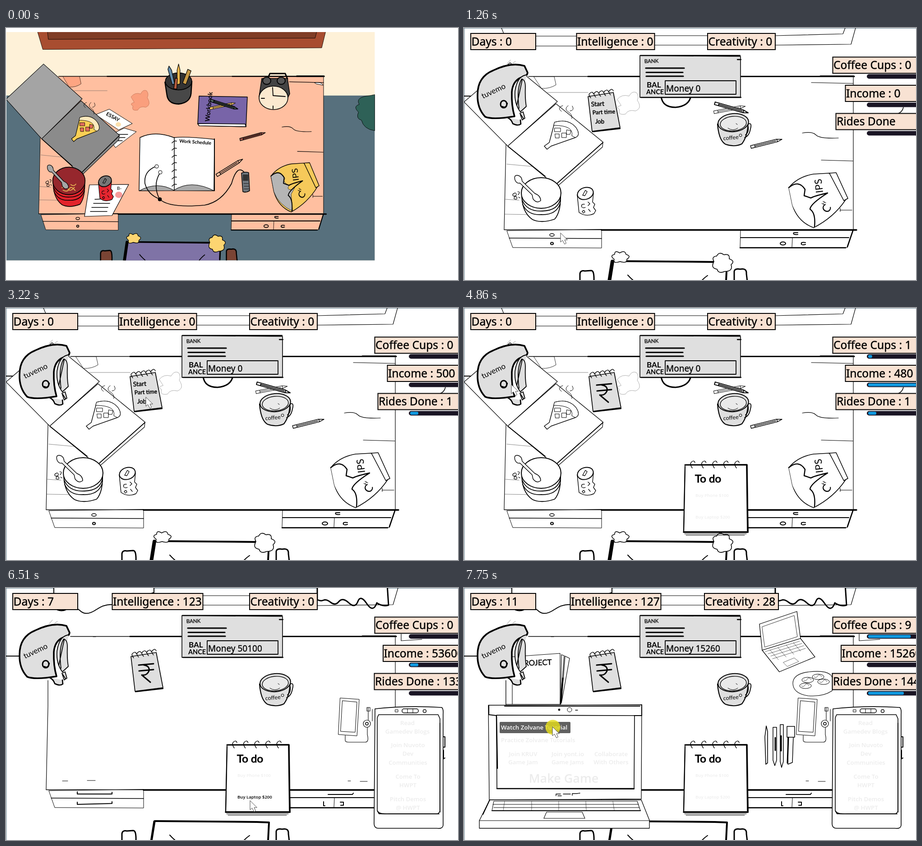
An HTML page for the animation above (7.81 s loop, 1002 by 559 pixels).

```html
<!DOCTYPE html>
<html lang="en">
<head>
<meta charset="utf-8">
<title>Desk game</title>
<style>
html,body{margin:0;width:100%;height:100%;overflow:hidden;background:#fff}
svg{display:block;width:1002px;height:559px}
path{stroke-linecap:round;stroke-linejoin:round}
</style>
</head>
<body>
<svg id="stage" viewBox="0 0 1002 559" xmlns="http://www.w3.org/2000/svg"></svg>
<script>
const LOOP = 7810, GREY = '#dfdfdf', PALE = '#ececec';
const HAND = "Lato,sans-serif", UI = "'Noto Sans','Open Sans',sans-serif", BTN = "'Open Sans','Noto Sans',sans-serif";

const P = (d, w = 1.5, fill = 'none', ink = '#000') =>
  `<path d="${d}" fill="${fill}" stroke="${ink}" stroke-width="${w}"/>`;
const E = (x, y, rx, ry, w = 1.5, fill = 'none', rot = 0) =>
  `<ellipse cx="${x}" cy="${y}" rx="${rx}" ry="${ry}" fill="${fill}" stroke="#000" stroke-width="${w}" transform="rotate(${rot} ${x} ${y})"/>`;
const R = (x, y, w, h, fill, sw = 0, r = 0) =>
  `<rect x="${x}" y="${y}" width="${w}" height="${h}" rx="${r}" fill="${fill}" stroke="#000" stroke-width="${sw}"/>`;
const T = (x, y, s, size, o = {}) =>
  `<text x="${x}" y="${y}" font-size="${size}" font-family="${o.font || HAND}" font-weight="${o.w || 400}" fill="${o.fill || '#000'}" stroke="#000" stroke-width="${o.bold || 0}" text-anchor="${o.mid ? 'middle' : 'start'}" transform="rotate(${o.rot || 0} ${x} ${y})">${s}</text>`;
const rings = (x, y, gap, n, h, slope = 0) => {
  let d = '';
  for (let i = 0; i < n; i++) d += `M${x + i * gap},${y + h + i * slope}q-7,${-h * .7} -1,${-h}q5,-4 7,2`;
  return P(d, 1.4);
};

// room and desk; tidy swaps handles, curtains and cushions
function room(col, tidy) {
  const f = c => col ? c : '#fff', desk = f('#ffbfa0');
  let s = '';
  if (col) s += R(0, -10, 1002, 580, '#fef1d8') + R(0, 155, 1002, 420, '#57707d') +
    P('M84,-8L100,41L858,37L870,-8Z', 1, '#a84d30') + P('M112,-8L115,16L840,13L846,-8Z', 1, '#803d26') +
    P('M990,155Q948,158 960,177Q942,182 958,196Q950,212 966,216Q972,238 1002,242V153Z', 1, '#2e6157');
  else s += P('M0,.5H1002M1,0V559', 1, 'none', '#6c8796') + P('M0,151H' + (tidy ? 30 : 16), 2);
  if (tidy) s += P('M106,0V44Q120,55 136,47T165,51T200,48T243,38L328,10V-8H106Z', 2, f('#9a3f46'))
    + P('M690,-8V26Q698,30 704,27T720,32T738,30T760,33T780,30T800,35T822,33Q835,42 848,38L845,-8Z', 3, f('#9a3f46'))
    + P('M428,17H540M428,38H540M690,39L858,37L869,0M876,102V117L922,114', 1.2);
  else if (!col) s += P('M83,0L88,12M160,18H250M160,40H250M423,17H540M423,38H540M690,17L840,13L845,0M690,38L858,36L868,0', 1.2)
    + P('M962,190Q972,186 974,176M984,233Q994,232 1002,238', 1.5);
  s += P('M96,108H863V447H89Z', 0, desk, 'none');
  s += P('M95,450L108,487L305,488V447Z', 1, desk) + P('M613,449L612,487H850L862,449Z', 1, desk);
  s += P('M143,107.5H863', 1.6) + P('M275,107.5H440M615,107.5H865', 3) + P('M790,107H864', 3.6);
  s += P('M93,205V262L89,447M863,107V447', 1.2) + P('M89,447.5H305', 1.6) + P('M305,448H870', 3.4) + P('M612,487.5H846M862,450L850,485', 2.6);
  s += P('M100,466L305,467', 1.3) + P('M613,465H853', 2.2) + P('M728,466L727,486', 1);
  if (tidy) s += P('M158,452V457H235V453M158,475V480L235,478V474', 2) + P('M714,458H768L770,455M704,474V483H707M741,475H748V482H742', 2)
    + P('M125,428H137M180,427H198M758,428H764M785,429H801M193,108H199', 1);
  else s += E(195, 459, 5, 3) + E(195, 478, 3, 2.5, 2) + P('M740,454H731Q728,459 740,458M757,476Q746,474 748,480Q751,482 757,480', 2) + E(707, 478, 6, 3.5, 2);
  s += P('M322,570L330,518L555,518L583,520L581,570Z', 1, f('#7f73a6')) + P('M322,562L329,518', tidy ? 5 : 8) + P('M330,517L555,519', 4) + P('M555,519L583,520L581,560', 4);
  s += P('M363,548Q370,556 378,562M540,549Q530,556 525,563', 2);
  s += P('M257,562V545Q258,537 268,539L282,538Q289,538 288,562', 3, f('#7a4434')) + P('M599,562V540Q600,533 612,535Q627,532 626,545L628,562', 3, f('#7a4434'));
  if (!tidy) s += P('M346,518Q330,524 333,513Q322,505 334,502Q334,492 345,499Q357,492 359,502Q372,506 361,513Q362,523 346,518Z', 1.5, f('#fcd571'))
    + P('M578,540Q564,546 561,535Q546,533 554,518Q548,507 560,506Q566,495 576,503Q590,500 588,512Q602,517 592,525Q597,540 578,540Z', 1.6, f('#fcd571'));
  return s;
}

const pen = (x, y, a, n, fill, w = 1.5) =>
  `<g transform="translate(${x} ${y}) rotate(${a})">${P(`M0,-3H${n - 11}L${n},0L${n - 11},3H0Z M9,-3V3M${n - 11},-3V3M9,0H${n - 14}`, w, fill)}</g>`;

// clutter lying on the untidy desk
function clutter(col) {
  const f = c => col ? c : '#fff';
  let s = P('M770,121L863,123M750,233Q772,229 780,237Q788,246 830,244M792,293L862,295M835,404H860M834,400V407', 1.2);
  s += P('M95,302L150,307M92,380L122,382M90,413L150,414M185,143H275', .7, 'none', '#555');
  s += P('M155,108H200L204,126Q190,135 172,134Z', .8, f('#fda582'));
  s += P('M340,158Q350,146 366,151Q372,139 382,143Q389,151 384,160Q396,178 380,184Q364,180 358,191Q340,194 345,181Q334,175 348,172Z', .8, f('#fa9f7d'), col ? '#b76b50' : '#999');
  // pencil pot
  s += P('M432,122L437,152Q440,176 469,176Q500,173 503,150L505,120Z', 3, f('#484848')) + E(469, 120, 36, 21, 2, f('#333'));
  s += P('M452,128L440,90L443,82L450,92L458,126Z', 1.5, f('#638cab')) + P('M465,128V92L469,77L473,92V126Z', 1.5, f('#f3b74c')) + P('M480,124L494,90L503,94L489,128Z', 1.5, f('#c89a45')) + P('M456,138L460,112L466,113L464,139Z', 1.5, f('#b55d3f'));
  // pizza box
  s += P('M0,164L102,77L207,163L97,262Z', 1.2, f('#a4a4a4')) + P('M97,262L204,168L308,253L307,264L206,352Z', 1.2, f('#8b8b8b'));
  s += P('M98,263L180,329M308,254L206,345', 1.9);
  s += P('M216,185Q205,177 219,172M231,172Q221,180 231,186T239,201M240,173Q246,183 235,184', 1);
  s += P('M184,269L178,262L189,254L201,209Q232,200 249,222Q259,238 247,243L193,262Z', 1.4, f('#f9cf55')) + P('M201,209Q232,200 249,222Q259,238 247,243L239,239Q244,216 199,216Z', 1, f('#fce9bd'));
  s += P('M201,222H214V230H201ZM217,233H227V243H217ZM202,235H211V244H203ZM228,226L237,228L235,236H227Z', 1, f('#e36d5c'));
  // bowl, spoon and flies
  s += P('M128,366Q127,408 152,425Q172,434 201,424Q216,407 214,364Z', 1.8, f('#e2232b')) + E(171, 366, 44, 34, 2, f('#96272d'));
  s += P('M129,382Q140,408 174,406Q209,405 214,378M130,391Q141,416 172,414Q204,415 213,390', 1.8);
  if (col) s += P('M152,383q10,-8 16,2t18,-3M155,389q12,6 17,-3t16,4M176,375q8,6 14,-1', 2, 'none', '#e6b653');
  s += P('M113,337Q110,325 120,327Q128,329 129,340L157,367Q170,372 170,383Q161,390 153,379L151,370L124,344Q117,346 113,337Z', 1.4, f('#a5a5a5'));
  s += P('M108,369q8,-7 8,2q-8,5 -8,-2m11,-6q7,0 1,7m-9,9q0,-8 6,-4q2,7 -6,4m10,-4l3,2', 1.2);
  // can
  s += P('M251,370L255,409Q270,420 288,412L292,405L287,398L290,391L285,386L287,366Z', 1.4, f('#e52630')) + E(269, 367, 18, 13, 2, f('#777'), -18);
  s += P('M263,371l6,-11l4,3l-5,9zM267,391q-8,-1 -6,6q2,3 8,1M262,407q4,-5 6,1q-3,5 -6,-1M275,386l4,4l-4,4M276,402l4,5', 1.3);
  // crisps
  s += P('M720,354Q740,330 775,324L810,322L846,381Q820,420 775,443Q740,430 728,393Z', 1.6, f('#f6c95a')) + P('M810,322L825,321L851,378L842,383Z', 1.6, f('#f6c95a'));
  s += P('M720,354Q742,335 758,360Q750,370 770,377Q760,388 777,388L785,382L775,399L779,441Q740,424 728,393Z', .8, f('#b5b5b5'), col ? '#000' : 'none') + P('M720,354Q742,336 756,358L754,372L769,377Q778,372 806,366Q768,390 767,402Q780,410 777,441', 2.4);
  s += T(796, 365, 'IPS', 22, {rot: -97}) + T(807, 412, 'C', 25, {rot: -60}) + T(799, 394, 'H', 11, {rot: -60});
  // pens
  s += pen(554, 187, -11, 71, f('#e9bb61'), 1) + pen(556, 167, 16, 77, f('#5b6d6d'), 2) + pen(636, 264, -14, 71, f('#aa5b4d'), 1.5);
  return s;
}

// things only the painted untidy desk has, in stage units
function extras() {
  let s = P('M425,213L428,151L535,153L532,219L445,217Z', 1.5, '#7864a8') + P('M425,212L530,213L532,219L428,217Z', 1.5, '#fff') + T(451, 208, 'Workbook', 14, {rot: -84, w: 700});
  s += P('M199,192L229,180L280,212L250,226ZM225,240L262,222L289,230L243,265Z', 1, '#fff') + T(221, 193, 'ESSAY', 11, {rot: 28, w: 700}) + P('M240,236H270M244,243H264M248,250H258', 1.4) + E(249, 214, 6, 5, 0, '#fbe0ae');
  s += P('M185,348L272,347L235,416L174,418Z', 1.2, '#fff') + P('M194,389H230M190,398H226M187,407H224M197,380L220,379', 1.5) + E(250, 370, 8, 7, 0, '#f79a9a') + T(246, 359, 'B-', 10);
  s += P('M297,243Q330,227 372,243Q400,240 462,247L461,361L372,360L295,361Z', 1.4, '#fff') + P('M296,361Q335,339 372,360Q410,335 461,361Z', 1.2, '#aaa');
  let d = 'M373,243V360';
  for (let y = 252; y < 360; y += 16) d += `M368,${y + 3}q5,-6 10,-4`;
  s += P(d, 1.5) + T(384, 254, 'Work Schedule', 10.5, {rot: 4, w: 700}) + P('M462,246V361', 2);
  s += P('M332,307Q305,318 308,345Q315,370 340,379Q360,400 440,393Q478,386 500,345Q512,302 528,320M341,322Q325,348 340,379', 1.7) + E(334, 307, 4, 4, 1, '#fff') + E(342, 320, 4, 4, 1, '#fff') + E(341, 380, 4, 4, 1, '#000');
  s += P('M522,322Q530,318 538,321L540,361Q532,366 525,363Z', 1.5, '#70777d') + R(525, 325, 12, 14, '#333') + P('M527,345h10M528,351h10M528,357h10', 1.6, 'none', '#333');
  s += pen(467, 327, -32, 68, '#ffbfa0', 1.4);
  s += P('M580,112L585,101H619L624,113', 3) + P('M561,152L567,112H624L629,146L624,156Z', 1.5, '#444') + E(578, 117, 9, 8, 2, '#555') + E(610, 117, 9, 8, 2, '#555') + E(593, 155, 32, 26, 1.6, '#fbe9cf') + P('M591,132L592,150L619,152M566,156H573M592,173V179', 1.8);
  s += P('M684,121Q700,119 703,127L688,124Z', 1, '#fff');
  return s;
}

const palmtop = f => P('M741,244L783,247L778,328L737,325ZM746,250L778,253L774,320L742,318Z', 1, f) +
  P('M752,327V338Q752,342 760,342H797Q805,341 801,325V309M803,297V265M800,265h7v8h-7zM812,269v26', 1.1) + E(800, 301, 8, 8, 1.2, f) + E(800, 301, 3, 3);
function rewards(f) {
  let s = P('M100,153L213,145V258H93V205M107,214V258', 1.1, f) + T(123, 173, 'PROJECT', 17, {rot: -2, bold: .4}) + P('M216,148L222,150L214,257ZM224,151L234,156L216,255Z', 1.2, f) + P('M219,200L214,257', 3);
  s += P('M655,80L738,52L746,112L661,138Z', 1.3, f) + P('M661,86L732,61L739,108L667,131Z', .8, f) + P('M661,138L746,112L778,153L699,186Z', 1.3, f) + P('M668,141L744,118M674,146L749,123M680,151L753,128M684,157L757,134M678,137L697,159M696,132L714,153M714,126L731,147M730,121L746,140M708,165L732,155L742,163L717,174Z', .6);
  s += P('M729,212Q729,190 765,186Q800,182 812,192Q824,205 816,228Q795,242 762,239Q730,234 729,212Z', 1.1, f);
  [[762, 204], [757, 217], [785, 197], [797, 208]].forEach(([x, y]) => s += E(x, y, 13, 6, 1, f) + P(`M${x - 9},${y}q5,4 8,-2t9,2`, .7));
  s += P('M670,306L667,330L669,391L673,388V318Z', 1.6, f) + P('M685,309h8v73l-4,12l-4,-12zM701,303h7v82l-4,13l-3,-13zM716,307h17v24h-17zM718,331h12l-2,56l-10,4z', 1.5, f) + P('M690,332V360M703,328V361M719,332L717,388', 3);
  return s;
}

const helmet = P('M95,198Q105,202 108,212Q119,218 126,213L125,204', 2.6, GREY) + P('M112,196Q64,204 47,197Q29,178 30,148Q30,108 65,94Q104,75 134,84L141,99Q140,108 126,110Q108,118 106,142Q105,172 112,196Z', 3.6, GREY) +
  P('M139,104Q118,106 113,140Q111,168 125,186L138,174Q135,155 136,130Q136,115 128,113Q116,133 122,178M129,115L117,172', 1.8, GREY) + P('M124,189L131,186L135,200L129,204ZM126,192L132,201', 1.8, GREY) +
  P('M95,80L103,71M108,78L114,74', .8, 'none', '#777') + T(42, 157, 'tuvemo', 17, {rot: -25}) + E(88, 169, 7, 8, 3) + P('M85,174Q93,179 96,167', 2.5);
const bank = P('M390,61L613,63V153L390,154Z', 1.6, GREY) + P('M391,61H612M606,70H614M392,154H614', 2.3) + T(400, 78, 'BANK', 11.5, {rot: -2, bold: .3}) +
  P('M403,89H488M404,98.5H485M404,107H486', 3.2) + T(405, 132, 'BAL', 17, {w: 700}) + T(404, 147, 'ANCE', 14.5, {w: 700}) + P('M446,117H603V147H446Z', 1.8, GREY);
const cup = P('M562,213Q565,250 580,258Q600,265 616,257Q629,240 630,209Z', 2.2, GREY) + E(597, 210, 34, 20, 2, GREY, -5) + E(597, 212, 29, 16, 1.4, '#eaeaea', -5) + P('M630,213Q639,209 635,224Q632,240 622,243M630,219Q632,232 624,237', 1.8) + P('M585,222Q596,230 607,222M603,212l3,2', 1) + T(575, 249, 'coffee', 12.5, {rot: -5}) + E(613, 238, 3, 3, 1);
const pad = P('M275,152L331,143L346,221L284,229Z', 1.7, GREY) + P('M285,230L346,223', 2.4) + rings(281, 144, 11, 5, 11, -1.6);
const jobPad = pad + T(282, 174, 'Start', 14, {rot: -3, bold: .5}) + T(285, 192, 'Part time', 12.5, {rot: -3, bold: .5}) + T(291, 212, 'Job', 13, {bold: .5});
const cashPad = `<g transform="translate(2 0)">${pad}</g>` + P('M294,171L327,168M295,184L327,181M306,171Q319,173 317,184Q312,195 301,193L320,209', 3);
const todo = P('M490,348L627,347L630,498H487Z', 1.6, '#fff') + P('M490,348H627', 3) + P('M627,348L629,497M487,497H629', 3.6) + P('M490,352L487,495', 2.3) + P('M489,501H626M492,504H622', 1) + rings(506, 341, 24.5, 5, 14) + T(512, 387, 'To&#160;do', 24, {bold: 1});
const phone = P('M818,268Q890,260 966,265Q970,268 969,280V526Q968,535 955,533H826Q815,533 816,520Z', 1.6, '#fff') + P('M826,281H958L962,290V496L957,501H827L823,494V288Z', 1.6, '#fff') + P('M824,495Q826,502 850,501M850,501H960M962,300V497M970,330H973V353H970M970,360V379L973,377', 2) + R(878, 268, 36, 9, '#fff', 1.5, 4) + P('M890,268v9M902,268v9M863,270h6v5h-6z', 1) + E(928, 273, 3.5, 3.5);
const bigLaptop = P('M54,260L394,259L393,468L56,470Z', 1.3, '#fff') + P('M55,261V281L72,283M394,259V283H377M90,262H390', 2) + P('M72,282L378,283L377,446L73,445Z', 1.6, '#fff') + P('M73,445H377M72,284L74,400', 2.5) + E(234, 270, 5, 5, 1) + E(211, 270, 2, 2, 1, '#000') + P('M247,271h5M204,461V457H214M208,461H216M240,460V456H250L257,455M220,457H236', 1.4) +
  P('M57,470H393L411,515V533H34V516Z', 1.3, '#fff') + P('M34,516H411M66,473H384L391,494H62ZM64,480H387M66,487H389M183,497H262L268,511H177Z', 1.1) +
  P('M90,473l-3,20M150,473v20M210,473v20M270,473l1,20M330,473l3,20', .6) + P('M57,470L42,502M62,494H391', 2);

const btn = (x, y, s, o = {}) => T(x, y, s, o.size || 13.3, {font: BTN, w: 600, fill: o.fill || PALE, mid: o.mid});
const rows = (x, list, o) => list.map(([y, s]) => btn(x, y, s, {mid: true, ...o})).join('');

const lineScene = (tidy, won) => room(0, tidy) + (tidy ? palmtop('#fff') + (won ? rewards('#fff') : '') : clutter(0));
const paint = inner => `<g clip-path="url(#frame)">${inner}</g>`;
const warp = s => `<g transform="matrix(.8157 0 0 .897 0 10.8)">${s}</g>`;
const scenes = {
  messy: paint(warp(room(1, 0)) + extras() + warp(clutter(1))),
  clean: paint(warp(room(1, 1) + rewards('#f4eee6') + palmtop('#f4eee6'))),
  line: lineScene(0), tidy: lineScene(1), won: lineScene(1, 1)
};

const label = (x, y, w, s) => R(x, y, w, 36, '#f8e2d3', 2) + T(x + 1.5, y + 26.5, s, 24.6, {font: UI, w: 500, bold: .45});
const bar = (y, end) => R(893, y - 4.5, 120, 10, '#1a1524', 0, 5) + (end ? R(896, y - 3, end - 896, 7, 'url(#blue)', 0, 3) : '');
const centred = (mid, base, name, v) => {
  const w = base + 14 * String(v).length;
  return label(mid - w / 2, 12, w, `${name} : ${v}`);
};

// stepped progress through a time window
const part = (t, a, b, n) => t < a ? 0 : Math.min(1, (Math.floor((t - a) / ((b - a) / (n - 1)) + 1e-6) + 1) / n);
const ramp = (p, a, b) => Math.max(0, Math.min(1, (p - a) / (b - a)));
const mix = (a, b, p) => Math.round(a + (b - a) * p);
const along = (p, pts) => {
  let i = 0;
  while (i < pts.length - 2 && p > pts[i + 1][0]) i++;
  const [a, x, y] = pts[i], [b, u, v] = pts[i + 1], k = ramp(p, a, b);
  return [x + (u - x) * k, y + (v - y) * k];
};

function stateAt(t) {
  const A = part(t, 1590, 2370, 13), B = part(t, 2520, 3300, 13), D = part(t, 3560, 4340, 13), F = part(t, 4400, 5060, 11),
    G = part(t, 5200, 5530, 6), H = part(t, 5670, 5730, 2), I = part(t, 5870, 6630, 13), J = part(t, 6750, 7490, 12), K = part(t, 7550, 7750, 3);
  let pos;
  if (t < 2520) pos = along(A, [[0, 214, 455], [.3, 520, 474], [.55, 802, 340], [.75, 470, 200], [.92, 51, 91], [1, 80, 140]]);
  else if (t < 3560) pos = along(B, [[0, 80, 140], [.15, 52, 92], [.4, 95, 160], [.62, 200, 238], [.82, 310, 198], [1, 310, 198]]);
  else if (t < 4400) pos = along(D, [[0, 312, 200], [.4, 560, 320], [.6, 590, 215], [1, 600, 220]]);
  else if (t < 5200) pos = along(F, [[0, 600, 220], [.45, 105, 170], [.75, 105, 170], [.9, 540, 410], [1, 885, 320]]);
  else if (t < 5870) pos = along(G, [[0, 885, 320], [.3, 885, 305], [1, 885, 305]]);
  else if (t < 6750) pos = along(I, [[0, 885, 305], [.25, 885, 305], [.45, 94, 160], [.6, 94, 160], [.72, 590, 220], [.84, 541, 472], [1, 541, 472]]);
  else pos = along(J, [[0, 541, 472], [.2, 541, 472], [.4, 100, 165], [.6, 590, 215], [.8, 196, 308], [1, 196, 308]]);

  const run = ramp(F, .7, 1), ride = ramp(I, .45, .65), last = ramp(J, .35, .65);
  const s = {pos, scene: J > .3 ? 'won' : F > .75 ? 'tidy' : 'line', hide: t >= 3420 && t < 3560,
    cash: F > .15, todo: D > .35, phone: F > .75, laptop: J > .2, G, H, I, J, K, t};
  s.days = t >= 6750 ? mix(7, 11, last) : I ? mix(5, 7, ride) : mix(0, 5, run);
  s.iq = J ? mix(123, 127, last) : I ? mix(20, 123, ramp(I, 0, .3)) : H ? 16 + 4 * H : mix(0, 16.5, G);
  s.art = K ? mix(25, 28, K) : mix(0, 25, ramp(J, .75, 1));
  s.rides = J ? mix(133, 144, last) : I ? mix(74, 133, ride) : run ? mix(1, 74, run) : B > .4 ? 1 : '';
  s.income = J > .2 ? mix(13600, 15260, last) : I ? mix(229, 536, ride) * 100 : run ? mix(480, 22900, run) : D > .6 ? 480 : B > .45 ? 500 : 0;
  s.money = J > .2 ? mix(10100, 15260, last) : I ? mix(194, 501, ride) * 100 : mix(0, 194, run) * 100;
  s.cups = J ? mix(0, 9, last) : I > .65 ? 0 : D > .6 ? 1 : 0;
  s.bars = [s.cups && 894 + s.cups * 10.7,
    J ? (last === 1 ? 0 : 914) : ride > .5 ? 914 : run > .4 ? 933 : D > .6 ? 1006 : 0,
    J ? (last > .5 ? 975 : 0) : I ? (ride === 1 ? 0 : 975) : run > .4 ? 975 : s.rides ? 914 : 0];
  return s;
}

function board(s) {
  const {pos: [x, y], t} = s;
  let out = helmet + bank + T(448, 141, 'Money ' + s.money, 19, {font: UI, bold: .3}) + (s.cash ? cashPad : jobPad) + cup;
  if (s.todo) out += todo + btn(513, 419, 'Buy Phone $100', {size: 9.6, fill: '#eee'}) +
    btn(513, 467, 'Buy Laptop $200', {size: 9.6, fill: y > 440 && t > 6000 && t < 6900 ? '#000' : '#eee'});
  out += label(15, 12, 144, 'Days : ' + s.days) + centred(336, 159, 'Intelligence', s.iq) + centred(615, 136, 'Creativity', s.art);
  out += label(817.5, 64.5, 200, 'Coffee Cups : ' + s.cups) + label(s.income > 999 ? 836 : 845.5, 127, 200, 'Income : ' + s.income);
  out += label([824.5, 824.5, 823.5, 816.5][String(s.rides).length], 189.5, 200, 'Rides Done' + (s.rides === '' ? '' : ' : ' + s.rides));
  out += [107, 170, 233].map((v, i) => bar(v, s.bars[i])).join('');
  if (s.phone) {
    const over = x > 830 && y < 332, press = over && (s.H || Math.round(s.G * 6) % 2 === 0);
    out += phone + (over ? R(833, 285, 116, 47, press ? '#7f7f7f' : '#606060', 0, 3) : '');
    out += rows(890, [[304, 'Read'], [323, 'Gamedev Blogs']], {fill: press ? '#f3131b' : over ? '#fff' : PALE});
    out += rows(891, [[353, 'Join Nuvoto'], [372, 'Dev'], [392, 'Communities'], [423, 'Come To'], [442, 'HWPT'], [473, 'Pitch Demos'], [492, '@ HWPT']]);
  }
  if (s.laptop) {
    const over = x > 79 && x < 235 && y > 296 && y < 322;
    out += bigLaptop + (over ? R(79, 297, 157, 25, '#606060', 0, 2) : '') + btn(82, 314, 'Watch Zolvane Tutorial', {fill: over ? '#fff' : PALE}) + btn(82, 342, 'Practice Zolvane Tutorials');
    out += rows(131, [[373, 'Join KRUV'], [391, 'Game Jam']]) + rows(230, [[373, 'Join yont.io'], [391, 'Game Jams']]) + rows(326, [[373, 'Collaborate'], [391, 'With Others']]);
    out += btn(221, 432, 'Make Game', {size: 27, mid: true});
    if (s.K === 1 || (s.J === 1 && !s.K)) out += `<circle cx="197" cy="309" r="16.5" fill="#e5dc1c" opacity=".82"/>`;
  }
  if (!s.hide) out += `<g transform="translate(${x.toFixed(1)} ${y.toFixed(1)})" opacity="${t >= 3360 && t < 3420 ? .5 : 1}">${P('M0,0V20L4.5,16L9,24.5L12.5,22.5L9,15H15Z', 1, '#fff', '#444')}</g>`;
  return out;
}

const stage = document.getElementById('stage');
stage.innerHTML = `<defs><clipPath id="frame"><rect x="1" y="9" width="817" height="506.5"/></clipPath>
<linearGradient id="blue" x1="0" y1="0" x2="0" y2="1"><stop offset="0" stop-color="#0a78b8"/><stop offset=".4" stop-color="#12a8f0"/><stop offset="1" stop-color="#0b79bd"/></linearGradient></defs>
<g id="back"></g><g id="front"></g>`;
const back = document.getElementById('back'), front = document.getElementById('front');
let shown = '', drawn = '';

function render(t) {
  const s = t < 1260 ? {scene: t < 400 ? 'messy' : 'clean'} : stateAt(t);
  if (s.scene !== shown) back.innerHTML = scenes[shown = s.scene];
  const html = t < 1260 ? '' : board(s);
  if (html !== drawn) front.innerHTML = drawn = html;
}

const start = performance.now();
function tick() {
  render((performance.now() - start) % LOOP);
  requestAnimationFrame(tick);
}
tick();
</script>
</body>
</html>
```
